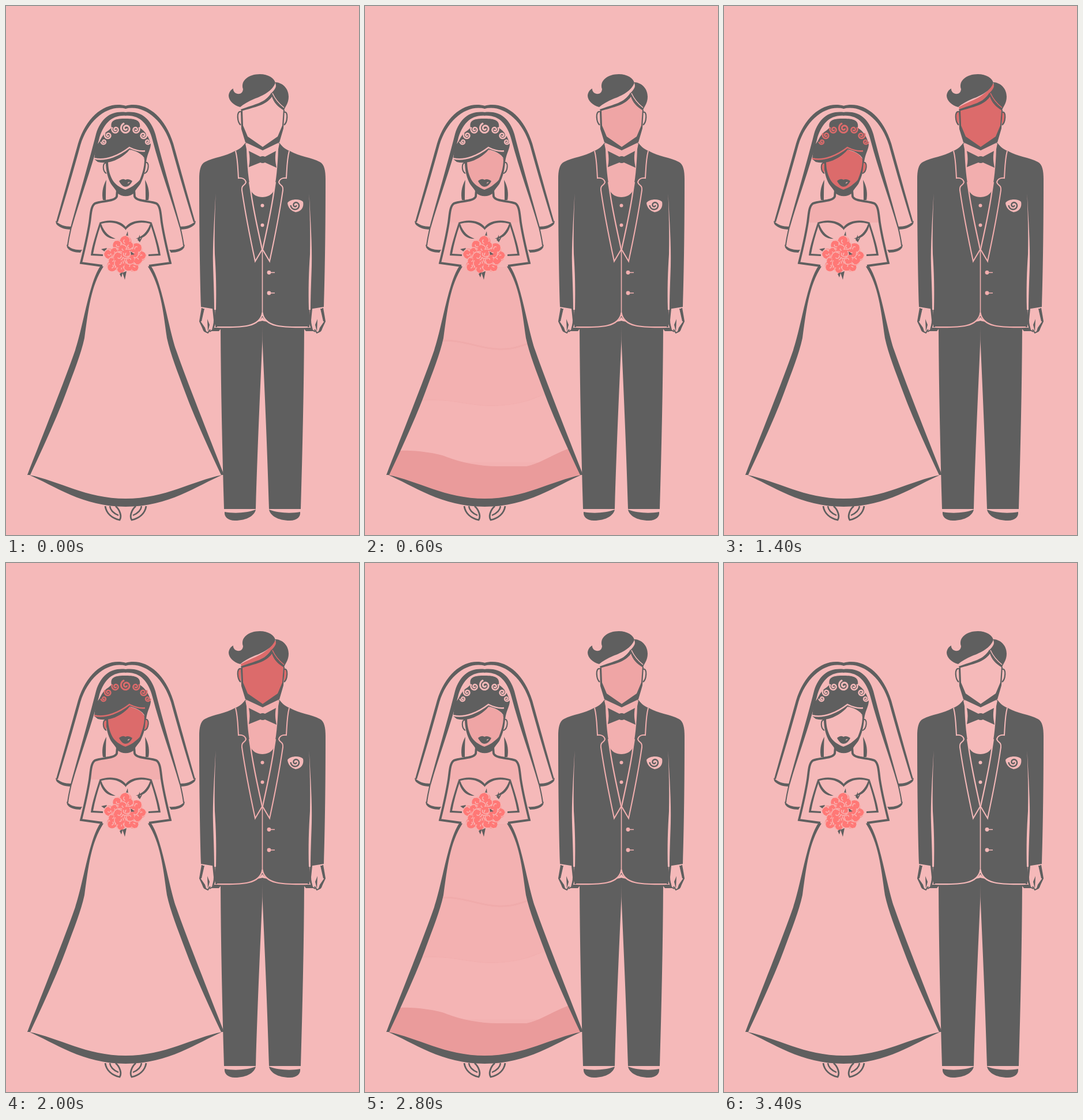
Recreate the animation shown at these times as an HTML page with a canvas. Size 612 by 916 pixels, loop 3.6 s.

```html
<!DOCTYPE html>
<html lang="en">
<head>
<meta charset="utf-8">
<title>Bride and groom</title>
<style>
html, body { margin: 0; width: 100%; height: 100%; overflow: hidden; background: #f5b9b9; }
canvas { display: block; width: 612px; height: 916px; }
</style>
</head>
<body>
<canvas id="stage" width="612" height="916"></canvas>
<script>
const ctx = document.getElementById('stage').getContext('2d');
const BG = '#f5b9b9', INK = '#5f5f5f', RED = '#d65c5c', SOFT = '#f3b1b1';
const BRIDE = 207.5, GROOM = 444.5;
const STEP = 200;

// Colours of the glow as it climbs from the shoes to the faces.
const LIT = { skin: '#f2aeae', shirt: '#f2aeae', face: '#d96262', trim: '#d96262' };
const PEAK = { ...LIT, face: '#dc6b6b', trim: '#dc6b6b' };
const GLOW = [
  {},
  { shoe: RED },
  { hem: RED },
  { hem: '#ea9b9b', skirt: SOFT, arms: '#f4b4b4', skin: '#f3b0b0', shirt: '#f2afaf', face: '#efa5a5' },
  { hem: '#f3b0b0', skirt: SOFT, arms: '#f2afaf', skin: '#efa7a7', shirt: '#efa8a8', face: '#ea9a9a' },
  LIT, LIT, PEAK, PEAK
];

function fill(d, color = INK) {
  ctx.fillStyle = color;
  ctx.fill(new Path2D(d));
}

function line(d, width, color = INK) {
  ctx.strokeStyle = color;
  ctx.lineWidth = width;
  ctx.stroke(new Path2D(d));
}

function dot(x, y, r, color) {
  ctx.fillStyle = color;
  ctx.beginPath();
  ctx.arc(x, y, r, 0, 7);
  ctx.fill();
}

function mirror(axis, draw) {
  draw();
  ctx.save();
  ctx.translate(2 * axis, 0);
  ctx.scale(-1, 1);
  draw();
  ctx.restore();
}

function spiral(x, y, r, turns, width, color) {
  ctx.beginPath();
  for (let i = 0; i <= 40; i++) {
    const a = i / 40 * turns * 2 * Math.PI, q = r * (0.12 + 0.88 * i / 40);
    ctx.lineTo(x + q * Math.cos(a), y + q * Math.sin(a));
  }
  ctx.strokeStyle = color;
  ctx.lineWidth = width;
  ctx.stroke();
}

function veil() {
  mirror(BRIDE, () => {
    fill('M208 173C176 164 141 187 125 238C113 281 98 335 87 374L90 374C102 335 117 285 129 241C143 195 178 170 208 178Z');
    fill('M208 184C184 181 165 192 156 222C143 273 125 335 112 383L114 384C128 335 147 285 161 232C168 204 184 188 208 190Z');
    fill('M86 372C93 379 102 382 113 382L112 387C101 387 91 383 87 377Z');
    line('M113 383C111 393 108 404 107 415', 2);
    fill('M105 413C112 421 122 423 132 422L129 427C119 427 109 424 106 418Z');
    fill('M174 301C167 313 166 326 168 336L173 336C173 324 173 313 174 301Z');
  });
}

function skirt(glow) {
  ctx.save();
  ctx.clip(new Path2D('M166 451C145 490 137 560 127 590C108 648 63 745 40 812C90 828 140 859 207.5 860C275 859 325 828 375 812C352 745 307 648 288 590C278 560 270 490 249 451Z'));
  if (glow.skirt) {
    fill('M30 440H390V870H30Z', glow.skirt);
    fill('M90 683C150 677 190 697 240 691C270 689 290 681 306 674L390 690V790H30V683Z', '#f4b4b4');
    line('M125 580C170 575 200 596 240 594C260 594 280 585 296 580', 3, '#f0abab');
    line('M95 683C150 677 190 697 240 691C270 689 290 681 306 674', 1.5, '#f2afaf');
  }
  if (glow.hem)
    fill('M30 770H62C85 769 126 774 142 781C168 791 200 797 230 797L280 797C303 793 329 774 355 766H390V870H30Z', glow.hem);
  ctx.restore();
  mirror(BRIDE, () => {
    fill('M164 450C145 475 134 555 120 596C102 648 63 745 37 812L42 812C63 768 90 708 104 670C118 632 130 603 136 575C143 525 147 485 169 451Z');
    fill('M38 811C85 831 132 867 208 867L208 853C138 853 92 822 40 812Z');
  });
}

function brideFeet(glow) {
  mirror(BRIDE, () => {
    const shoe = 'M172 866C174 879 184 887 197 890C201 884 198 873 190 866';
    if (glow.shoe) fill(shoe + 'Z', glow.shoe);
    line(shoe, 2.8);
    line('M180 866C181 875 188 879 195 882', 2.4);
  });
}

function brideBody(glow) {
  const edge = 'M193 318L192 330C188 339 165 337 154 342C147 347 147 361 145 375';
  const arm = 'C141 400 135 425 130 445L167 450';
  mirror(BRIDE, () => {
    if (glow.arms) fill(edge + arm + 'H208V318Z', glow.arms);
    if (glow.skin) fill(edge + 'H163C179 368 200 373 208 386V318Z', glow.skin);
    line(edge + arm, 3.8);
    fill('M162 376C157 392 149 415 147 432L168 433V430L151 429C154 412 159 395 164 380Z');
    fill('M162 375C177 369 198 370 208 383V388C196 374 180 373 165 377C170 392 179 399 190 403C175 404 165 393 162 375Z');
  });
}

function brideHead(glow) {
  const trim = glow.trim || BG;
  const inner = 'M177 268C193 267 206 259 214 249C227 252 237 257 240 266C240 280 236 291 232 301C225 309 216 315 207 318C198 315 188 308 184 300C179 290 177 281 177 268Z';
  fill('M173 269C173 286 177 299 182 308C187 315 191 319 193 324C201 331 214 331 222 324C224 319 228 315 233 308C239 296 243 281 243 266L214 248Z');
  fill(inner, glow.face || BG);
  const ears = 'M174 272C167 270 167 286 174 290M242 271C249 269 248 287 240 290';
  if (glow.trim) fill(ears, trim);
  line(ears, 2);

  fill('M183 211C180 197 190 195 208 195C225 195 234 198 232 211C242 217 248 227 251 240C250 250 245 255 243 270C239 258 231 253 214 248C202 264 180 275 159 270L153 265C154 256 155 248 157 240C164 237 164 224 177 216Z');
  line('M153 264C174 269 197 258 214 245C224 250 233 252 241 251', 2.4, trim);
  fill('M196 303C201 299 204 299 207 301C211 299 214 300 219 303C216 310 211 313 207 313C203 313 199 309 196 303Z');
  line('M211 307L214 305', 1.2, BG);

  spiral(208, 212, 9.5, 1.7, 3, trim);
  mirror(BRIDE, () => {
    spiral(190, 214, 6.8, 1.6, 2.5, trim);
    spiral(177, 224, 6.5, 1.6, 2.5, trim);
    spiral(169.5, 235, 5, 1.5, 2.2, trim);
  });
}

function bouquet() {
  fill('M228 405L232 396L232 404L237 400L232 409ZM207 400L211 390L212 402ZM197 464L203 459L200 470ZM202 462L209 459L206 474ZM165 421L175 419L172 426Z');
  for (let i = 0; i < 19; i++) {
    const a = i * 2.4, q = Math.sqrt((18.5 - i) / 19);
    const x = 205 + 30 * q * Math.cos(a), y = 433 + 27 * q * Math.sin(a), r = 8 + i % 3;
    dot(x, y, r, '#ff7876');
    ctx.strokeStyle = '#f8b5b3';
    ctx.lineWidth = 1.5;
    for (let k = 0; k < 3; k++) {
      ctx.beginPath();
      ctx.ellipse(x, y, r - 3 * k, (r - 3 * k) * 0.8, a + k, 0.4 * k, 3.2 + 0.3 * k);
      ctx.stroke();
    }
  }
  fill('M216 425L223 430L217 431Z');
}

function groomLegs(glow) {
  mirror(GROOM, () => {
    if (glow.shoe) fill('M380 870H432V876H380Z', glow.shoe);
    fill('M372 557C372.5 660 375 770 378 871L433 871C436.5 750 441 660 444.5 578L445 545L400 554Z');
    fill('M379 876C395 879 418 878 433 872C431 882 418 891 397 891C384 891 378 884 379 876Z');
    fill('M361 557L374 557L369 563L356 563Z');
    line('M340 523L336 546L344 563L350 566L354 560M361 524L362 545L358 561L353 564', 2);
    fill('M336 544L345 557L348 566L342 562ZM349 542L353 552L350 564Z');
    fill('M340 524L344 524L339 546L336 546ZM358 524L362 524L364 548L359 562L360 544Z');
  });
}

function jacket(glow) {
  const light = glow.shirt || BG;
  mirror(GROOM, () => {
    fill('M415 237C409 245 403 249 397 251C380 261 360 262 345 270C337 274 335 285 335 300C335 380 336 460 338 521L363 525V556C405 557 432 556 445 538V247Z');
    fill('M363.5 325C361 370 358 415 359 450C360 480 361 505 361 526L364 526C365 490 364 460 362 430C361 390 362.5 355 363.5 325Z', BG);
    fill('M415 238L417 248C418 280 421 303 424 318C427 327 436 331 445 331V239Z', light);
    line('M398 251C402 266 402 283 403 298C410 297 415 300 416 305C415 311 408 309 409 319C415 360 424 405 432 442L444.5 421', 2, light);
    line('M422 305L424 318C429 355 437 388 444 421', 2.2, light);
    line('M366 556C410 557 441 556 444.5 531', 2.2, light);
  });
  line('M444.5 421V537', 1.6, light);
  fill('M421 251L441 261Q445 259 449 261L468 251C466 262 467 270 469 280L449 271Q445 273 441 271L421 279C423 270 423 260 421 251Z');
  for (const y of [345.5, 379.5]) dot(444.5, y, 3, light);
  for (const y of [461.5, 497]) {
    dot(456, y, 3.4, light);
    line(`M457 ${y}H466`, 1.5, light);
  }
  fill('M488 341C493 334 509 333 515 339C517 348 512 356 502 357C495 355 489 350 488 341Z', BG);
  spiral(502, 345, 8.5, 1.5, 2.4, INK);
}

function groomHead(glow) {
  const trim = glow.trim || BG;
  const inner = 'M409 181C430 174 451 169 460 151C463 162 471 171 481 178L480 207L471 228L445 245L418 228L410 208Z';
  const ears = 'M407 183C399 181 401 202 407 206M482 184C490 181 488 202 482 206';
  if (glow.face) fill(inner, glow.face);
  if (glow.trim) fill(ears, trim);
  // Hair parting
  fill('M407 175C430 162 455 158 464 134L469 136C469 151 449 169 408 179Z', trim);
  fill('M394 143C393 153 410 157 411 144C406 129 421 118 440 118C455 118 465 125 467 133C462 147 446 155 430 161C420 165 412 170 406 175C395 172 386 164 386 155C387 148 390 145 394 143Z');
  fill('M467 132C482 133 490 145 490 157C490 168 485 173 482 180C472 172 463 163 460 151C464 147 468 142 468 138Z');
  line('M462 151C466 160 473 169 482 176', 1.5, trim);
  fill('M407 179C431 170 450 168 460 150C463 162 471 172 482 178V181C470 174 464 166 461 157C451 172 431 175 408 182Z');
  fill('M407 182L410 181L411 207L419 226L445 244L471 226L479 207L481 179L483 180L481 212L474 236L445 250L415 236L408 213Z');
  line(ears, 2.2);
}

function draw(t) {
  const s = Math.floor(t / STEP) % 18;
  const glow = GLOW[s < 9 ? s : 17 - s];
  ctx.fillStyle = BG;
  ctx.fillRect(0, 0, 612, 916);
  brideFeet(glow);
  veil();
  skirt(glow);
  brideBody(glow);
  brideHead(glow);
  bouquet();
  groomLegs(glow);
  jacket(glow);
  groomHead(glow);
}

const start = performance.now();
function tick() {
  draw(performance.now() - start);
  requestAnimationFrame(tick);
}
tick();
</script>
</body>
</html>
```
